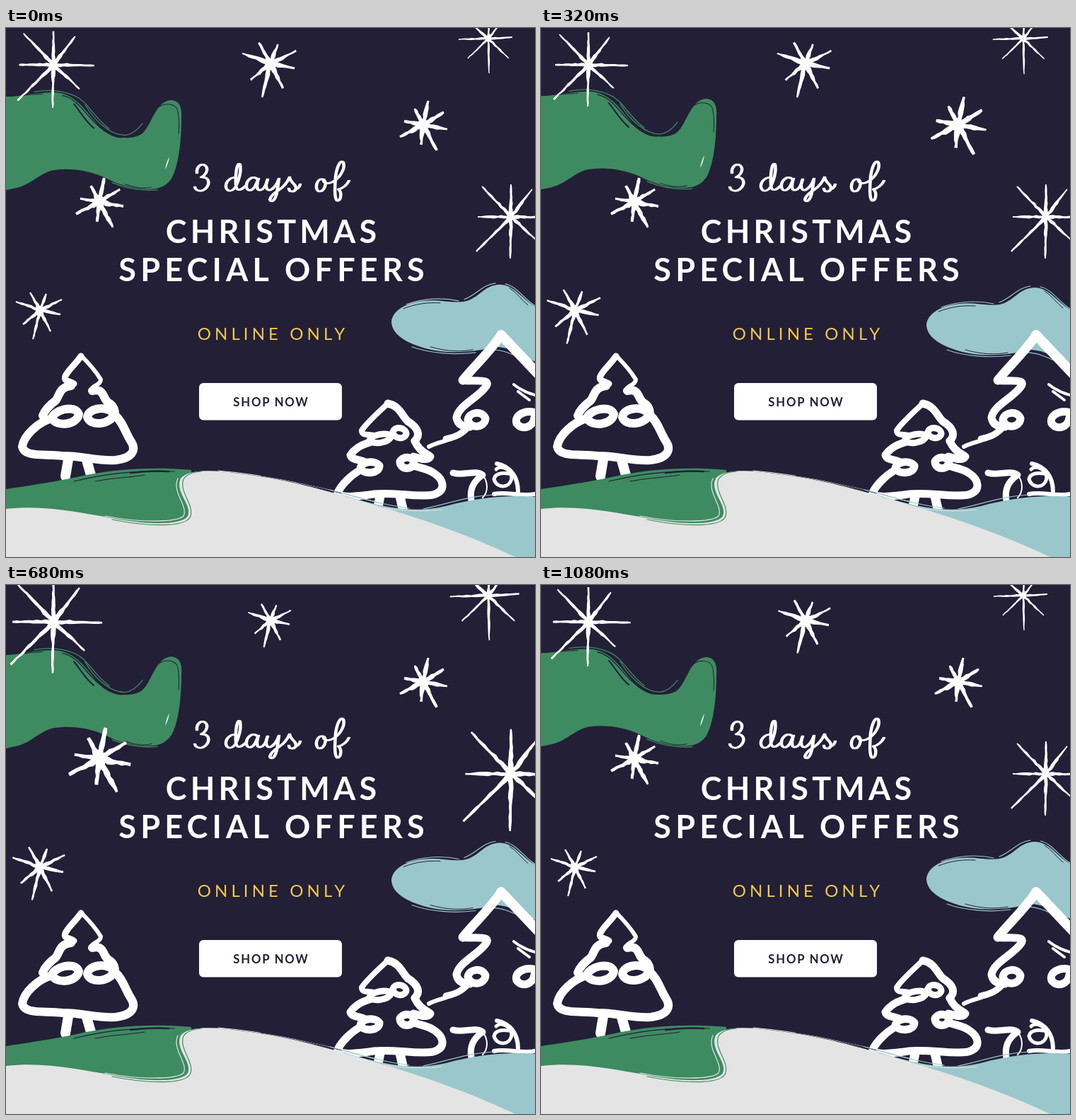
Write an HTML page that moves like this. It is 748 px wide and 748 px high and loops after 1120 ms.

```html
<!DOCTYPE html>
<html lang="en">
<head>
<meta charset="utf-8">
<title>Christmas special offers</title>
<style>
  html, body { margin: 0; width: 100%; height: 100%; overflow: hidden; background: #231f37; }
  svg { display: block; width: 100%; height: 100%; }
  text { font-family: Lato, "Open Sans", sans-serif; text-anchor: middle; fill: #fff; }
  .line { fill: none; stroke-linecap: round; stroke-linejoin: round; }
  .white { stroke: #fff; }
  .dark { stroke: #231f37; }
  .green { stroke: #3e8b61; }
  .blue { stroke: #9ac7cb; }
  .grey { stroke: #e4e4e4; }
</style>
</head>
<body>
<svg viewBox="0 0 748 748">
  <rect width="748" height="748" fill="#231f37"/>

  <g id="greenCloud">
    <path fill="#3e8b61" d="M-4 97C20 98 38 90 72 91C104 95 114 122 138 145C156 157 180 157 192 149C207 136 211 102 234 101C247 102 249 114 248 126C248 150 246 190 234 212C228 220 222 224 213 226C190 230 160 222 142 212C118 201 92 197 66 201C46 206 36 221 15 226L-4 230Z"/>
    <g class="line green" stroke-width="1.3">
      <path d="M40 90C62 86 82 89 96 95C116 103 122 124 146 142"/>
      <path d="M112 108C126 132 148 151 168 151C178 150 187 142 193 134"/>
      <path d="M34 216C46 205 56 201 72 198M150 218C170 226 192 230 214 228"/>
    </g>
    <g class="line dark" stroke-width="1.4">
      <path d="M80 95C106 101 114 129 140 145C149 152 156 154 164 154"/>
      <path d="M96 107C106 119 111 130 124 141" stroke-width="2"/>
      <path d="M214 112C226 103 241 106 243 117C245 129 245 138 244 148" stroke-width="1"/>
      <path d="M168 220C182 225 196 227 206 224M22 96C34 93 44 94 52 93" stroke-width="1"/>
    </g>
    <path fill="#e4f0e8" d="M231 181C230 188 228 194 225 199C226 192 228 186 231 181Z"/>
  </g>

  <g id="blueCloud">
    <path fill="#9ac7cb" d="M545 418C546 402 566 390 592 388C616 385 638 394 655 387C673 379 676 367 697 365C720 365 728 386 752 398V475C735 470 715 453 692 453C664 460 628 464 596 456C566 448 546 436 545 418Z"/>
    <g class="line blue" stroke-width="1.2">
      <path d="M566 393C590 384 618 383 640 388M648 386C666 379 674 365 692 363"/>
      <path d="M706 364C722 367 732 385 748 395M574 453C598 462 634 465 664 461M684 457C708 456 726 470 748 478"/>
    </g>
    <g class="line dark" stroke-width="1">
      <path d="M562 399C580 392 596 390 614 391M600 453C624 460 644 460 660 457M712 370C722 376 729 387 738 394"/>
    </g>
  </g>

  <g id="stars" fill="#fff"></g>

  <g class="line white" stroke-width="12">
    <path d="M106 464C98 476 89 482 84 492C81 500 88 498 96 503" stroke-width="9"/>
    <path d="M106 463C118 475 128 487 134 497C134 505 122 505 120 512" stroke-width="6"/>
    <path d="M92 506C74 508 76 521 70 527C62 533 55 540 52 548"/>
    <path d="M122 513C140 509 136 524 145 530C152 534 154 540 154 546"/>
    <path d="M103 546C97 531 66 541 65 552C72 565 101 561 103 546ZM115 550C117 536 145 534 153 546C148 561 119 564 115 550Z"/>
    <path d="M65 552C46 557 25 576 23 592C26 607 52 602 80 605C110 605 130 613 155 611C180 608 184 596 177 585C168 571 166 558 153 546"/>
    <path d="M88 610L84 634M114 611L120 632" stroke-width="14"/>
  </g>

  <g class="line white" stroke-width="11">
    <path d="M700 434C686 456 662 478 646 498" stroke-width="13"/>
    <path d="M700 434L752 489" stroke-width="14"/>
    <path d="M646 498C662 501 690 494 677 509C664 525 640 534 637 551C639 562 648 564 656 564"/>
    <path d="M678 552C673 540 655 543 653 554C658 568 677 565 678 552Z"/>
    <path d="M654 563C646 574 634 579 622 581" stroke-width="9"/>
    <path d="M634 578C620 586 612 585 598 592" stroke-width="6"/>
    <path d="M752 545C734 538 718 548 722 559C730 570 746 564 747 551"/>
    <path d="M718 504C728 512 738 517 752 520M724 514L740 526" stroke-width="4"/>
    <path d="M632 629C646 634 664 624 674 632C662 640 655 652 658 668" stroke-width="9"/>
    <path d="M674 632C682 642 682 656 674 664" stroke-width="2"/>
    <path d="M693 624C700 617 714 624 715 636C713 651 694 652 690 638C692 628 706 628 718 632" stroke-width="5"/>
    <path d="M694 616C714 620 724 636 724 655M690 659C708 655 730 663 748 659" stroke-width="6"/>
  </g>

  <g class="line white" stroke-width="11">
    <path d="M540 531C528 542 512 556 503 569C503 577 512 574 520 576" stroke-width="8"/>
    <path d="M540 531C556 534 560 548 568 556C584 566 586 576 578 584"/>
    <path d="M545 577C538 571 517 575 514 583C519 590 541 587 545 577ZM547 571C550 562 566 565 566 574C563 583 548 581 547 571Z" stroke-width="9"/>
    <path d="M514 586C500 590 492 596 487 604C489 611 499 610 506 613"/>
    <path d="M528 619C521 610 502 613 501 623C507 632 528 630 528 619ZM557 613C562 604 577 606 577 616C573 626 557 624 557 613Z"/>
    <path d="M501 625C488 632 474 646 469 657C474 666 500 662 520 659C550 656 580 664 604 660C624 654 618 638 606 630C596 622 582 622 575 618"/>
    <path d="M578 584C583 596 590 599 600 606C596 613 584 608 576 606"/>
    <path d="M529 662L525 682M557 662L562 684" stroke-width="13"/>
  </g>

  <path fill="#9ac7cb" d="M470 658C520 675 572 688 622 676C668 663 715 660 748 663V748H700L540 690Z"/>
  <path fill="#3e8b61" d="M0 652C40 646 72 641 100 635C150 624 205 620 262 625L262 702H0Z"/>
  <path fill="#e4e4e4" d="M0 680C58 674 106 686 150 693C200 703 250 703 257 690C264 675 238 656 247 637C257 624 292 624 330 630C400 638 452 654 520 674C585 693 655 717 720 748H0Z"/>
  <g class="line" stroke-width="1.2">
    <path class="green" d="M150 695C204 706 256 706 261 690C266 674 244 655 251 638C255 631 264 628 276 627"/>
    <path class="grey" d="M140 690C190 700 242 699 251 690C258 676 234 656 243 637"/>
    <path class="dark" d="M96 641C140 630 190 625 238 627M126 641C150 636 172 636 196 632"/>
    <path class="dark" d="M176 629C198 626 214 626 230 627" stroke-width="2.4"/>
    <path class="grey" d="M300 626C370 632 424 645 486 660M430 647C462 653 492 664 520 669"/>
    <path class="dark" d="M360 633C404 639 440 649 474 658" stroke-width="1"/>
    <path class="blue" d="M458 653C500 664 530 674 570 679M590 680C630 672 650 662 690 660"/>
    <path class="grey" d="M520 676C560 684 590 684 616 681" stroke-width="1"/>
  </g>

  <!-- Two offset passes act as a flat pen nib -->
  <g class="line white" stroke-width="2.5" role="img" aria-label="3 days of">
    <g id="script">
      <path d="M269 205C268 196 275 191 280 194C286 198 283 207 275 211C285 210 288 218 283 225C278 232 268 232 266 225"/>
      <path d="M327 214C319 207 309 217 310 225C312 233 320 231 324 224C328 216 332 203 330 193C326 188 323 205 324 222C325 232 331 230 338 223"/>
      <path d="M355 214C347 207 338 216 339 225C341 233 349 230 353 220L356 213C353 222 353 231 359 229C364 228 367 222 369 214"/>
      <path d="M369 214C365 223 367 231 373 229C379 226 383 219 385 213C383 226 382 243 375 245C369 245 373 236 385 229C391 225 396 220 400 211"/>
      <path d="M400 211C401 219 410 221 409 227C407 233 399 232 399 227M409 228C412 227 414 225 415 221"/>
      <path d="M447 214C438 212 435 228 441 231C449 232 454 219 448 214C447 219 454 222 462 217"/>
      <path d="M462 217C472 211 479 198 476 190C472 185 467 196 465 210C464 225 463 240 467 244C472 246 475 233 469 228C475 227 481 222 484 216"/>
    </g>
    <use href="#script" x="2"/>
  </g>

  <text x="377.6" y="304" font-size="45" font-weight="700" letter-spacing="5.2">CHRISTMAS</text>
  <text x="378.6" y="358" font-size="45" font-weight="700" letter-spacing="6.2">SPECIAL OFFERS</text>
  <text x="377.5" y="440.5" font-size="24" letter-spacing="5.1" style="fill:#f3c94b">ONLINE ONLY</text>
  <rect x="273" y="502" width="202" height="52.5" rx="6" fill="#fff"/>
  <text x="375" y="534.5" font-size="16.7" font-weight="700" letter-spacing="1.8" style="fill:#231f37">SHOP NOW</text>
</svg>
<script>
const LOOP = 1120, STEP = 40;
const $ = id => document.getElementById(id);

let seed = 7;
const rnd = () => (seed = seed * 16807 % 2147483647) / 2147483647;

// Ray tips relative to the star's centre
const slim = [[0,-46],[30,-39],[56,1],[36,33],[-1,59],[-49,49],[-47,0],[-41,-43]];
const small = [[1,-30],[20,-25],[34,-2],[29,28],[1,49],[-29,28],[-42,1],[-28,-24]];
const bent = [[-34,-12],[-14,-25],[9,-23],[31,-15],[29,6],[15,30],[-10,41],[-24,20]];
const chunky = [[7,-34],[29,-18],[34,6],[19,36],[-3,28],[-33,17],[-27,-5],[-12,-23]];

// pulse: peak time, rise and fall lengths, scale added at the peak
const stars = [
  { x: 67, y: 52, rays: slim, width: 2.6, size: 1, pulse: [805, 400, 400, .3] },
  { x: 374, y: 50, rays: bent, width: 2.9, size: 1.18, pulse: [830, 310, 310, -.4] },
  { x: 682, y: 15, rays: small, width: 1.8, size: 1, pulse: [590, 330, 330, .35] },
  { x: 590, y: 137, rays: chunky, width: 4, size: 1, pulse: [235, 250, 250, .22] },
  { x: 132, y: 246, rays: chunky, width: 4, size: 1, pulse: [630, 320, 320, .32] },
  { x: 714, y: 267, rays: slim, width: 2.6, size: 1, pulse: [722, 325, 325, .39] },
  { x: 48, y: 399, rays: bent, width: 2.7, size: 1, pulse: [450, 260, 420, .32] }
];

// A tapering brush stroke with uneven edges
function ray([dx, dy], width) {
  const len = Math.hypot(dx, dy), n = Math.ceil(len / 5), left = [], right = [];
  for (let i = 0; i <= n; i++) {
    const u = i / n, taper = width * (1 - .6 * u);
    for (const [side, list] of [[1, left], [-1, right]]) {
      const w = side * taper * (.65 + .7 * rnd()) / len;
      list.push(`${(dx * u - dy * w).toFixed(1)} ${(dy * u + dx * w).toFixed(1)}`);
    }
  }
  return `M${left.concat(right.reverse()).join("L")}Z`;
}

for (const s of stars) {
  s.el = document.createElementNS("http://www.w3.org/2000/svg", "path");
  s.el.setAttribute("d", s.rays.map(r => ray(r, s.width)).join(""));
  $("stars").append(s.el);
}

function swell(t, [peak, rise, fall, amount]) {
  const d = (t - peak + LOOP * 1.5) % LOOP - LOOP / 2;
  const x = Math.abs(d) / (d < 0 ? rise : fall);
  return x < 1 ? amount * (1 + Math.cos(Math.PI * x)) / 2 : 0;
}

function draw() {
  const t = Math.floor(performance.now() % LOOP / STEP) * STEP;
  for (const s of stars) {
    const k = s.size * (1 + swell(t, s.pulse));
    s.el.setAttribute("transform", `translate(${s.x} ${s.y}) scale(${k})`);
  }
  // Clouds sway twice per loop; the green one tilts as its ends move out of phase
  const a = t / LOOP * 4 * Math.PI, end = 2 * Math.sin(a);
  $("greenCloud").setAttribute("transform", `matrix(1 ${(Math.cos(a) - end) / 235} 0 1 0 ${end})`);
  $("blueCloud").setAttribute("transform", `translate(0 ${-2.2 * Math.cos(a)})`);
  requestAnimationFrame(draw);
}
draw();
</script>
</body>
</html>
```
